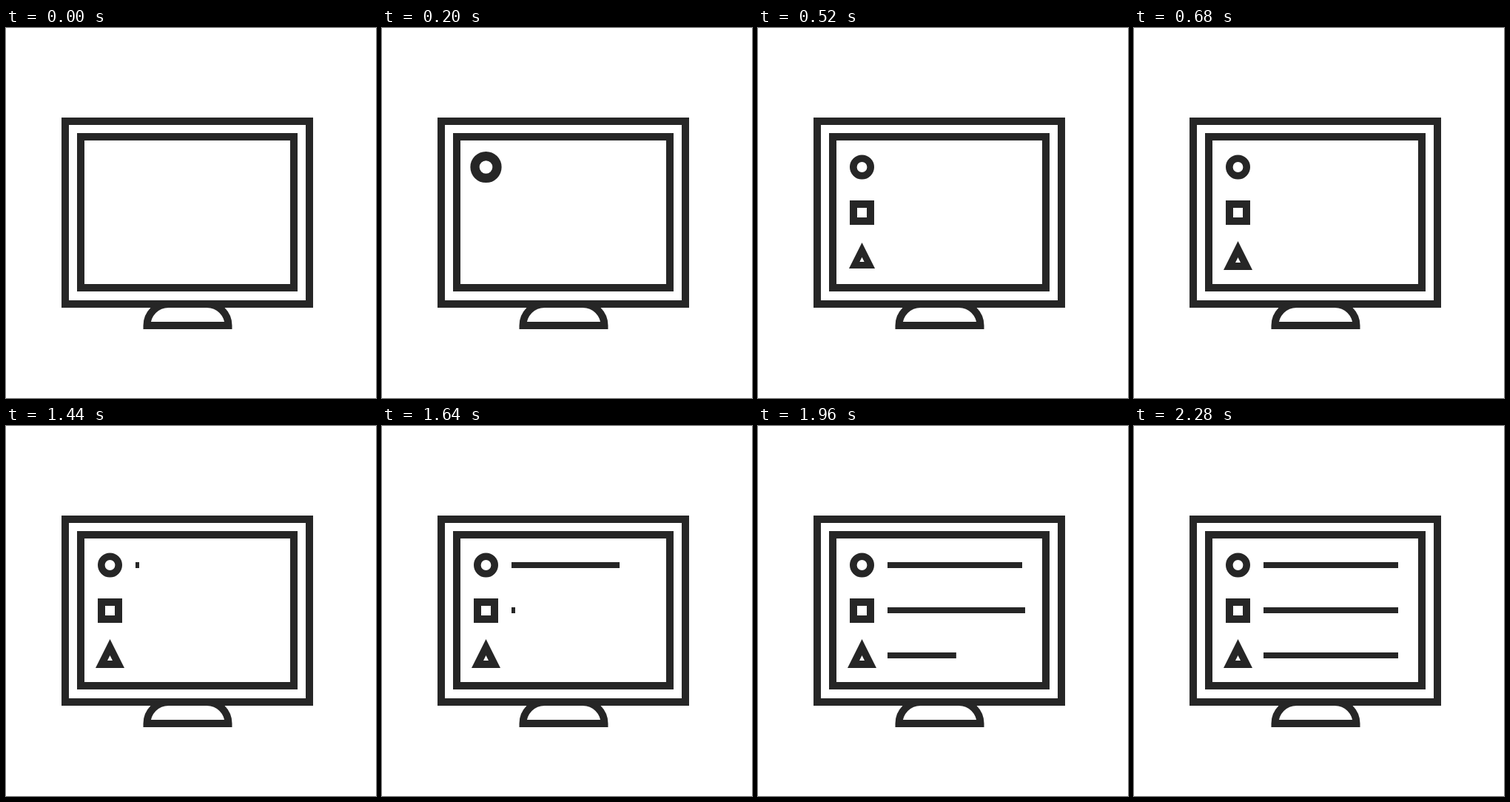
Animation, 500 px wide and 500 px high, one loop 3 s. Source, as an HTML page:

```html
<!DOCTYPE html>
<html lang="en">
<head>
<meta charset="utf-8">
<title>Monitor list</title>
<style>
html, body { margin: 0; width: 100%; height: 100%; overflow: hidden; background: #fff; }
svg { display: block; width: 100%; height: 100%; }
</style>
</head>
<body>
<svg viewBox="0 0 500 500" fill="#262626">
  <g fill="none" stroke="#262626" stroke-width="10">
    <rect x="80" y="126" width="330" height="247"/>
    <rect x="101" y="147" width="288" height="204"/>
    <path d="M190.5 402a29 29 0 0 1 29-29H271.5a29 29 0 0 1 29 29z"/>
  </g>
  <g class="icon"><circle r="11.7" fill="none" stroke="#262626" stroke-width="9.6"/></g>
  <g class="icon"><path fill-rule="evenodd" d="M-16.5-16.5h33v33h-33zM-6.5-6.5h13v13h-13z"/></g>
  <g class="icon"><path fill-rule="evenodd" d="M0-19L19.5 20h-39zM0 3L3.5 10h-7z"/></g>
  <rect class="line" x="175" y="184" height="8"/>
  <rect class="line" x="175" y="245" height="8"/>
  <rect class="line" x="175" y="306" height="8"/>
</svg>
<script>
const LOOP = 3000;
const icons = [...document.querySelectorAll('.icon')];
const lines = [...document.querySelectorAll('.line')];
const iconY = [188, 249.5, 307];
const iconStart = [0, 233, 400];

// Grow past full size, then settle back.
function pop(t) {
  if (t <= 0) return 0;
  if (t < 180) return 1.35 * t / 180;
  return 1.35 - 0.35 * Math.min(1, (t - 180) / 100);
}

// The tip runs slightly too far, then retracts.
function lineWidth(t) {
  if (t < 0) return 0;
  if (t > 320) return 186 - 4 * Math.min(1, (t - 320) / 120);
  const u = t / 320;
  return 5 + 181 * (u + u * (1 - u) * (0.19 + 0.75 * u));
}

function draw(now) {
  const t = now % LOOP;
  icons.forEach((el, i) => {
    const s = pop(t - iconStart[i]);
    el.setAttribute('transform', `translate(140.5 ${iconY[i]}) scale(${s})`);
  });
  lines.forEach((el, i) => el.setAttribute('width', lineWidth(t - 1440 - 200 * i)));
}

let start;
function tick(now) {
  start ??= now;
  draw(now - start);
  requestAnimationFrame(tick);
}
draw(0);
requestAnimationFrame(tick);
</script>
</body>
</html>
```
